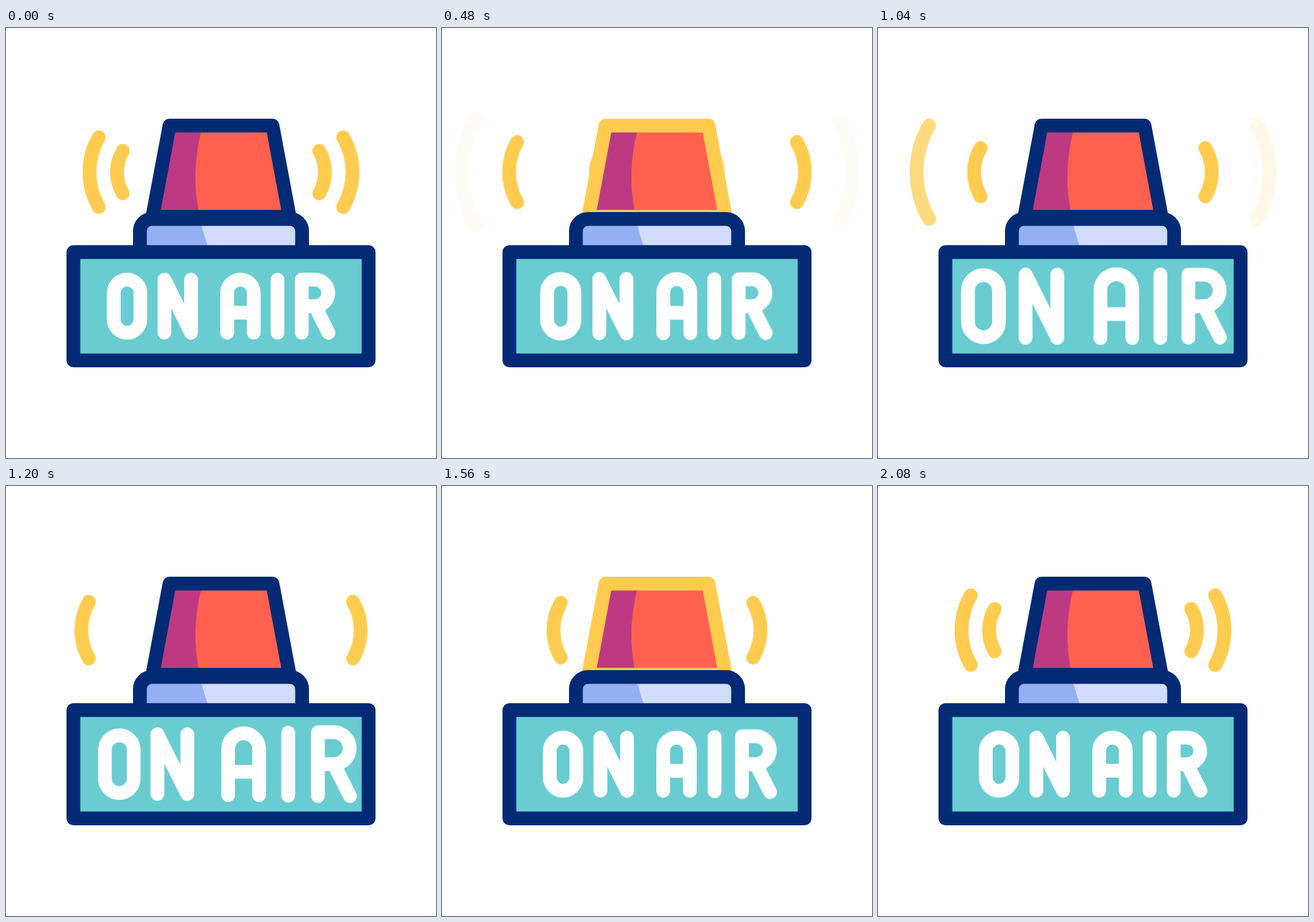
An HTML page that plays this animation: 640x640 px, repeating every 2400 ms.

```html
<!DOCTYPE html>
<html lang="en">
<head>
<meta charset="utf-8">
<title>On air</title>
<style>
  :root { --navy: #032a74; --gold: #ffcc50; }
  html, body { margin: 0; width: 100%; height: 100%; overflow: hidden; background: #fff; }
  svg { display: block; width: 640px; height: 640px; }

  .line { fill: none; stroke: var(--navy); stroke-width: 20.5; stroke-linecap: round; stroke-linejoin: round; }
  .wave, .letter { vector-effect: non-scaling-stroke; }
  .wave { stroke: var(--gold); transform-origin: 320px 214.5px; }
  .letter { stroke: #fff; transform-origin: 320px 414px; animation: 2.4s cubic-bezier(.333, 0, .667, 1) infinite; }

  .lamp { animation: flash 2.4s step-end infinite; }
  @keyframes flash {
    0%, 35%, 70.42% { stroke: var(--navy); }
    15.42%, 52.92% { stroke: var(--gold); }
    100% { stroke: var(--navy); }
  }

  /* The word swells from its middle, each letter peaking 75 ms after the last */
  .o { animation-name: swell-o; }
  .n { animation-name: swell-n; }
  .a { animation-name: swell-a; }
  .i { animation-name: swell-i; }
  .r { animation-name: swell-r; }
  @keyframes swell-o { 0%, 15%, 60%, 100% { transform: scale(1); } 37.5% { transform: scale(1.2); } }
  @keyframes swell-n { 0%, 15%, 63.125%, 100% { transform: scale(1); } 40.625% { transform: scale(1.2); } }
  @keyframes swell-a { 0%, 15%, 66.25%, 100% { transform: scale(1); } 43.75% { transform: scale(1.2); } }
  @keyframes swell-i { 0%, 15%, 69.375%, 100% { transform: scale(1); } 46.875% { transform: scale(1.2); } }
  @keyframes swell-r { 0%, 15%, 72.5%, 100% { transform: scale(1); } 50% { transform: scale(1.2); } }

  /* Waves: the first pair leaves, the next pair crosses, the last one settles */
  .wave { animation: 2.4s linear infinite; }
  .outer.first { animation-name: outer-leave, outer-leave-fade; }
  .inner.first { animation-name: inner-leave, inner-leave-fade; }
  .outer.next { animation-name: outer-cross, outer-fade; }
  .right .outer.next { animation-name: outer-cross, outer-fade-right; }
  .inner.next { animation-name: inner-cross, inner-fade; }

  @keyframes outer-leave {
    0% { transform: scale(1); animation-timing-function: cubic-bezier(.333, .15, .667, .5); }
    20.42%, 100% { transform: scale(1.5); }
  }
  @keyframes outer-leave-fade { 0%, 14.2% { opacity: 1; } 20.42%, 100% { opacity: 0; } }

  @keyframes inner-leave {
    0% { transform: scale(1); animation-timing-function: cubic-bezier(.333, 0, .667, 1); }
    26.67%, 100% { transform: scale(1.5); }
  }
  @keyframes inner-leave-fade { 0%, 20.42% { opacity: 1; } 26.67%, 100% { opacity: 0; } }

  @keyframes outer-cross {
    0%, 14.17% { transform: scale(.25); }
    20% { transform: scale(.463); }
    33.33% { transform: scale(.963); }
    43.33% { transform: scale(1.34); }
    47.92% { transform: scale(1.5); }
    50.83% { transform: scale(.335); animation-timing-function: cubic-bezier(.333, .77, .667, 1); }
    86.67%, 100% { transform: scale(1); }
  }
  @keyframes outer-fade {
    0%, 14.16% { opacity: 0; }
    14.17%, 41.8% { opacity: 1; }
    47.92%, 50.82% { opacity: 0; }
    50.83%, 100% { opacity: 1; }
  }
  @keyframes outer-fade-right {
    0%, 14.16% { opacity: 0; }
    14.17% { opacity: .8; }
    33.33% { opacity: .36; }
    43.33% { opacity: .14; }
    47.92%, 50.82% { opacity: 0; }
    50.83%, 100% { opacity: 1; }
  }

  @keyframes inner-cross {
    0%, 23.33% { transform: scale(.5); }
    33.33% { transform: scale(.8255); }
    43.33% { transform: scale(1.142); animation-timing-function: cubic-bezier(.333, .42, .667, .85); }
    57.08% { transform: scale(1.485); }
    58.33% { transform: scale(0); animation-timing-function: cubic-bezier(.333, .77, .667, 1); }
    86.67%, 100% { transform: scale(1); }
  }
  @keyframes inner-fade {
    0%, 23.32% { opacity: 0; }
    23.33%, 50.83% { opacity: 1; }
    57%, 58.32% { opacity: 0; }
    58.33%, 100% { opacity: 1; }
  }
</style>
</head>
<body>
<svg viewBox="0 0 640 640" role="img" aria-label="ON AIR">
  <g class="left">
    <path class="line wave outer first" d="M138.2 162.7A103.6 103.6 0 0 0 138.2 266.3"/>
    <path class="line wave outer next" d="M138.2 162.7A103.6 103.6 0 0 0 138.2 266.3"/>
    <path class="line wave inner first" d="M173.7 183A63 63 0 0 0 173.7 246"/>
    <path class="line wave inner next" d="M173.7 183A63 63 0 0 0 173.7 246"/>
  </g>
  <g class="right" transform="translate(640) scale(-1 1)">
    <path class="line wave outer first" d="M138.2 162.7A103.6 103.6 0 0 0 138.2 266.3"/>
    <path class="line wave outer next" d="M138.2 162.7A103.6 103.6 0 0 0 138.2 266.3"/>
    <path class="line wave inner first" d="M173.7 183A63 63 0 0 0 173.7 246"/>
    <path class="line wave inner next" d="M173.7 183A63 63 0 0 0 173.7 246"/>
  </g>

  <path fill="#ff6150" d="M243.4 145.2H396.6L422 281H218Z"/>
  <path fill="#bd3a83" d="M243.4 145.2H292.5L290 155Q275.5 217 287 274L288 281H218Z"/>
  <path class="line lamp" d="M243.4 145.2H396.6L422 281H218Z"/>

  <path fill="#d2dcfc" d="M199.3 333V302.3a18 18 0 0 1 18-18H422.7a18 18 0 0 1 18 18V333Z"/>
  <path fill="#94b0f2" d="M199.3 333V302.3a18 18 0 0 1 18-18H288.5Q293 304 303 333Z"/>
  <path class="line" d="M199.3 333V302.3a18 18 0 0 1 18-18H422.7a18 18 0 0 1 18 18V333"/>

  <rect class="line" x="100.3" y="333.4" width="439.4" height="161.3" style="fill:#68ccd1"/>

  <rect class="line letter o" x="160.4" y="374.4" width="39.6" height="79.2" rx="19.8"/>
  <path class="line letter n" d="M235.8 453.6V374.4L275.4 453.6V374.4"/>
  <path class="line letter a" d="M329.2 453.6V394.2a19.8 19.8 0 0 1 39.6 0V453.6M329.2 423.8H368.8"/>
  <path class="line letter i" d="M404.1 374.4V453.6"/>
  <path class="line letter r" d="M440.2 453.6V374.4H459.8a19.8 19.8 0 0 1 0 39.6H440.2M460 414L480 453.6"/>
</svg>
</body>
</html>
```
